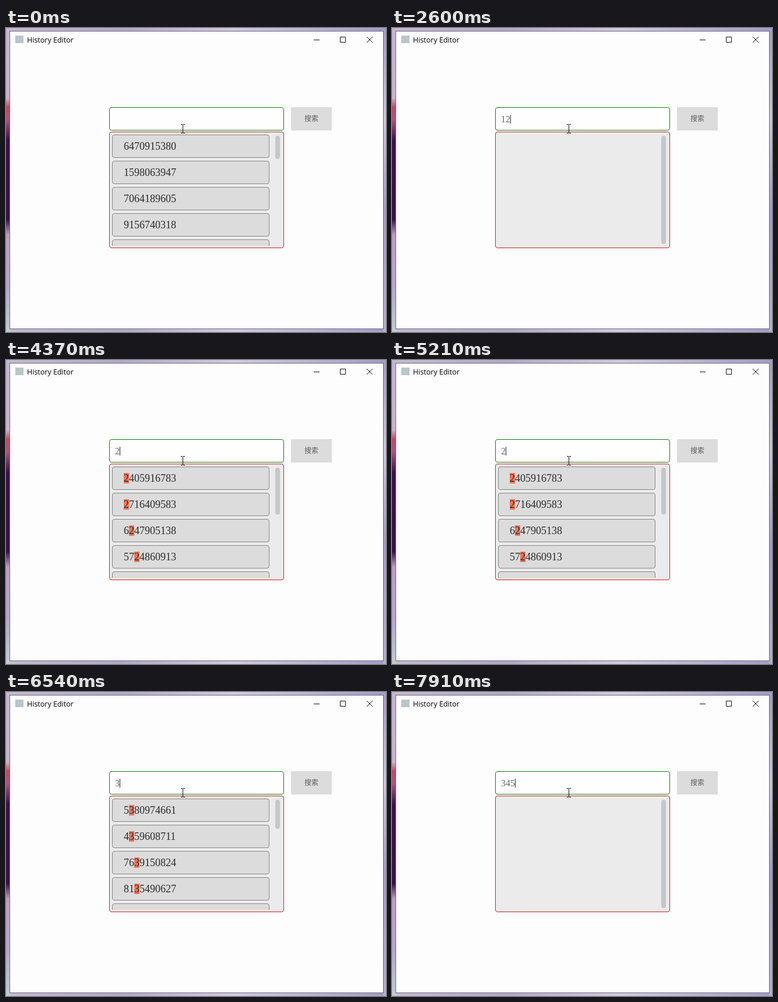
An HTML page that plays this animation: 652x522 px, repeating every 8 s.

```html
<!DOCTYPE html>
<html lang="zh">
<head>
<meta charset="utf-8">
<style>
  html, body { margin: 0; width: 652px; height: 522px; overflow: hidden; }
  svg { display: block; }
  .title { font: 12.5px "Open Sans", sans-serif; }
  .button { font: 500 12px "Noto Sans CJK SC", "Noto Sans CJK", sans-serif; fill: #5c5c5c; text-anchor: middle; }
  .query { font: 16px "Liberation Serif", serif; fill: #6a6a6a; }
  .entry { font: 18px "Liberation Serif", serif; fill: #2a2a2a; }
  .row { fill: #dcdcdc; stroke: #868686; }
</style>
</head>
<body>
<svg width="652" height="522" viewBox="0 0 652 522">
  <defs>
    <linearGradient id="left" x2="0" y2="1">
      <stop offset="0" stop-color="#c3b6d0"/>
      <stop offset=".23" stop-color="#c9b4cc"/>
      <stop offset=".26" stop-color="#c04a68"/>
      <stop offset=".3" stop-color="#b0557c"/>
      <stop offset=".37" stop-color="#3c1050"/>
      <stop offset=".63" stop-color="#38104c"/>
      <stop offset=".68" stop-color="#c09ac0"/>
      <stop offset=".85" stop-color="#b4a8cc"/>
      <stop offset="1" stop-color="#c0ccd2"/>
    </linearGradient>
    <linearGradient id="right" x2="0" y2="1">
      <stop offset="0" stop-color="#a49cc6"/>
      <stop offset=".3" stop-color="#cbc6e0"/>
      <stop offset=".6" stop-color="#a29cca"/>
      <stop offset="1" stop-color="#b6aed0"/>
    </linearGradient>
    <linearGradient id="across">
      <stop offset="0" stop-color="#c4bcd2"/>
      <stop offset=".3" stop-color="#b4a8c8"/>
      <stop offset=".6" stop-color="#d0cbe0"/>
      <stop offset="1" stop-color="#a49cc8"/>
    </linearGradient>
    <clipPath id="viewport"><rect x="181" y="182" width="272" height="192"/></clipPath>
  </defs>

  <rect width="652" height="522" fill="url(#across)"/>
  <rect width="7" height="522" fill="url(#left)"/>
  <rect x="647" width="5" height="522" fill="url(#right)"/>
  <rect x="6.5" y="5.5" width="641" height="511" fill="#fdfdfd" stroke="#6a6878"/>

  <rect x="16" y="13" width="14" height="13" fill="#b9c6c8"/>
  <text class="title" x="36" y="25">History Editor</text>
  <path d="M528 20.5h10M573.5 15.5h9v9h-9zM619 15l10 10M629 15l-10 10" fill="none" stroke="#111"/>

  <rect x="177.5" y="136.5" width="299" height="39" rx="3.5" fill="#fefefe" stroke="#0c800c"/>
  <rect x="489" y="136" width="70" height="40" fill="#dcdcdc"/>
  <text class="button" x="524" y="160">搜索</text>
  <rect x="177.5" y="178.5" width="299" height="199" rx="3.5" fill="#ebebeb" stroke="#d81c1c"/>

  <g id="live"></g>
  <path d="M300 165.5h3M304 165.5h3M300 180.5h3M304 180.5h3M303.5 166v14" stroke="#111"/>
</svg>
<script>
const LOOP = 8000, PITCH = 45;
const entries = `6470915380 1598063947 7064189605 9156740318 5380974661
  2405916783 7639150824 2716409583 4359608711 6247905138
  9085176420 8135490627 5724860913 7946228035 4069571834
  1857609432 6914078560 9408675103 5017694823 8690514770`.split(/\s+/);

// [start in ms, text in the search box]
const typing = [
  [0, ''], [30, '1'], [840, '12'], [2140, '1'], [2450, '12'],
  [2670, '1'], [2900, ''], [3130, '2'], [3300, '22'], [4150, '2'],
  [5740, ''], [6080, '3'], [6640, '34'], [7770, '345'],
];

const live = document.getElementById('live');
let shown = null;

// Matches, ordered by where the query first occurs
function search(query) {
  return entries.filter(e => e.includes(query))
    .sort((a, b) => a.indexOf(query) - b.indexOf(query));
}

function row(entry, index, query) {
  const y = 183 + index * PITCH;
  const mark = query &&
    `<rect x="${202 + 9 * entry.indexOf(query)}" y="${y + 11}" width="${9 * query.length}" height="18" fill="#f47458"/>`;
  return `<rect class="row" x="182.5" y="${y + .5}" width="269" height="39" rx="3.5"/>${mark}
    <text class="entry" x="202" y="${y + 26}">${entry}</text>`;
}

function render(query) {
  const found = search(query);
  const thumb = 186 * Math.min(1, 192 / Math.max(1, found.length * PITCH - 5));
  const caret = query &&
    `<rect x="${187 + 8 * query.length}" y="149" width="1" height="15" fill="#222"/>`;
  live.innerHTML = `<text class="query" x="187" y="162">${query}</text>${caret}
    <g clip-path="url(#viewport)">${found.slice(0, 5).map((e, i) => row(e, i, query)).join('')}</g>
    <rect x="462" y="185" width="8" height="${thumb}" rx="4" fill="#c6c6c6"/>`;
}

function tick() {
  const t = performance.now() % LOOP;
  const query = typing.filter(([start]) => start <= t).pop()[1];
  if (query !== shown) render(shown = query);
  requestAnimationFrame(tick);
}
tick();
</script>
</body>
</html>
```
